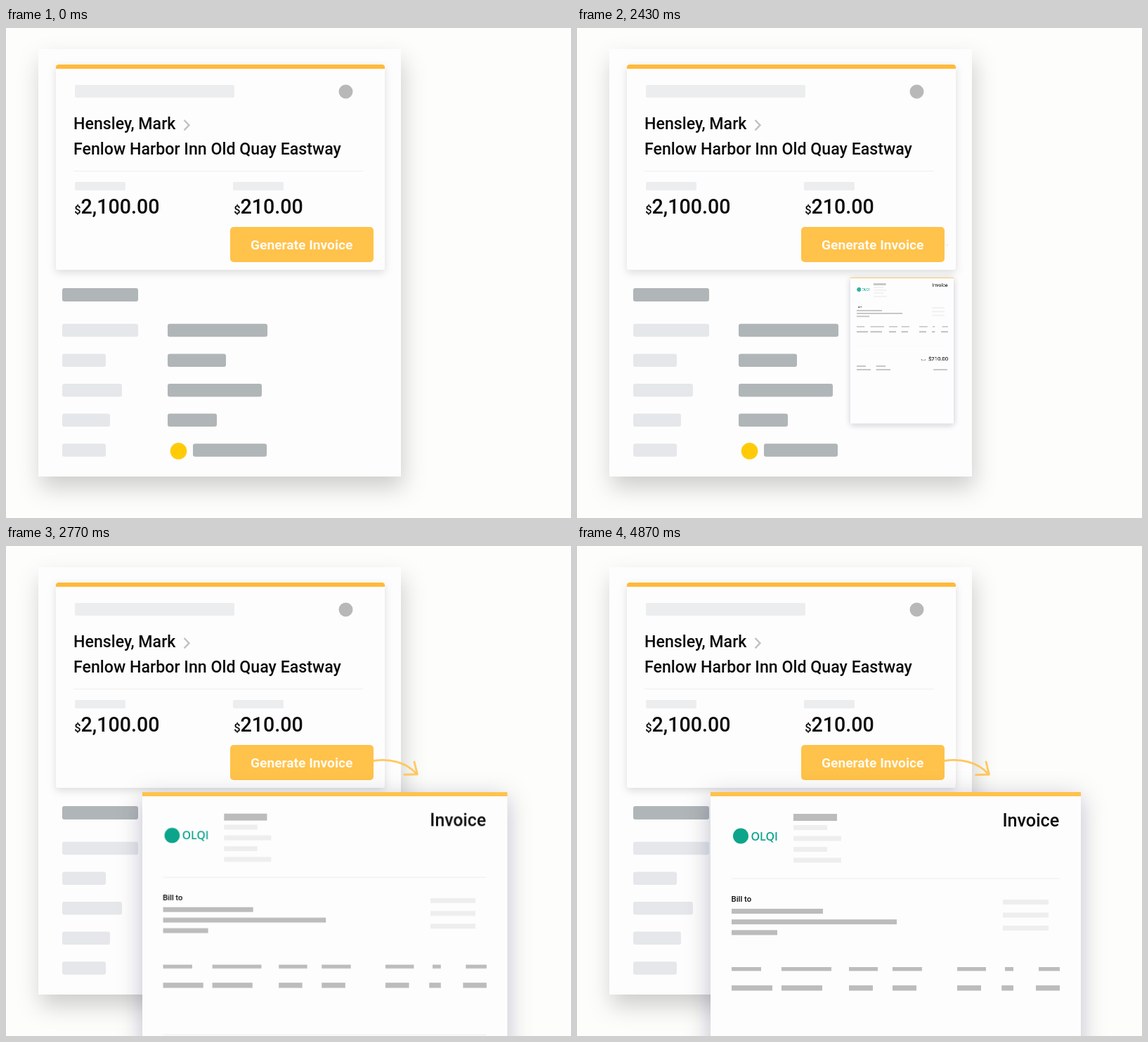
An HTML page for the animation above (4.91 s loop, 804x697 px).

```html
<!DOCTYPE html>
<html lang="en">
<head>
<meta charset="utf-8">
<title>Generate invoice</title>
<style>
  html, body { margin: 0; width: 100%; height: 100%; overflow: hidden; background: #fdfdfc; }
  svg { display: block; width: 804px; height: 697px; }
  text { font-family: Roboto, Arial, sans-serif; font-weight: 500; fill: #0b0b0d; }
  #invoice, #arrow { transform-box: view-box; transform-origin: 0 0; }
  .button { font-weight: 700; fill: #fffaf0; }
  .brand { font-family: 'Open Sans', sans-serif; font-weight: 600; }
  .brand, .mark { fill: #0ca58c; }
  .dark { fill: #b0b5b8; }
  .light { fill: #e5e7ea; }
  .pale { fill: #ecedef; }
  .ink { fill: #bcbcbd; }
  .faint { fill: #eeeeee; }
</style>
</head>
<body>
<svg viewBox="0 0 804 697">
  <defs>
    <filter id="deep" filterUnits="userSpaceOnUse" x="0" y="0" width="804" height="697">
      <feDropShadow dx="3" dy="16" stdDeviation="16" flood-color="#000" flood-opacity=".19"/>
    </filter>
    <filter id="soft" filterUnits="userSpaceOnUse" x="40" y="30" width="540" height="350">
      <feDropShadow dx="0" dy="4" stdDeviation="6" flood-color="#000" flood-opacity=".13"/>
    </filter>
    <filter id="cool" filterUnits="userSpaceOnUse" x="120" y="280" width="680" height="900">
      <feDropShadow dx="0" dy="8" stdDeviation="17" flood-color="#20263a" flood-opacity=".25"/>
    </filter>
  </defs>

  <g id="panel">
    <rect x="46" y="30" width="516" height="608" fill="#fdfdfd" filter="url(#deep)"/>
    <rect x="71" y="52" width="468" height="292" rx="4" fill="#fdfdfd" filter="url(#soft)"/>
    <path d="M71 58v-2a4 4 0 0 1 4-4h460a4 4 0 0 1 4 4v2z" fill="#ffba3a"/>
    <circle cx="483.5" cy="90.5" r="10" fill="#b8b8b8"/>
    <text x="96" y="144.3" font-size="23.2">Hensley, Mark</text>
    <path d="M253.5 131l7 7.2-7 7.2" fill="none" stroke="#bfc1c4" stroke-width="2.4"/>
    <text x="96" y="180.3" font-size="23.2">Fenlow Harbor Inn Old Quay Eastway</text>
    <path d="M96 203.5H508" stroke="#efefef"/>
    <text x="97.3" y="264" font-size="16.5">$</text>
    <text x="106.6" y="264.3" font-size="28.6">2,100.00</text>
    <text x="324.3" y="264" font-size="16.5">$</text>
    <text x="333.6" y="264.3" font-size="28.6">210.00</text>
    <rect x="319" y="283" width="204" height="50" rx="5" fill="#ffc24a"/>
    <text class="button" x="420.7" y="314.8" font-size="19.2" text-anchor="middle">Generate Invoice</text>
    <circle cx="245.5" cy="601.8" r="11.8" fill="#ffcb08"/>
  </g>

  <g id="arrow" fill="none" stroke="#ffc75c" stroke-width="2.8" stroke-linecap="round" stroke-linejoin="round">
    <path d="M523 305.5C546 302 570 307 585 324"/>
    <path d="M567.5 325.5L586.5 325L582 307"/>
  </g>

  <g id="invoice">
    <rect x="190" y="350" width="527" height="746" fill="#fdfdfd" filter="url(#cool)"/>
    <rect x="190" y="350" width="527" height="6" fill="#ffc24a"/>
    <circle class="mark" cx="233" cy="412.5" r="11"/>
    <text class="brand" x="247.5" y="418.5" font-size="16">OLQI</text>
    <text x="686.3" y="399" font-size="25.2" text-anchor="end">Invoice</text>
    <path d="M220 473H687M220 700H687" stroke="#ececf2"/>
    <text x="219.5" y="506" font-size="11.3">Bill to</text>
    <text x="549" y="776" font-size="11">Total</text>
    <text x="688" y="776.5" font-size="27.4" text-anchor="end">$210.00</text>
  </g>
</svg>
<script>
const LOOP = 4910, START = 2179, END = START + 700;
const EASE = 'cubic-bezier(.98, 0, .25, 1)';
const $ = id => document.getElementById(id);
const panel = $('panel'), invoice = $('invoice');

function bar(parent, cls, x, y, width, height, rx = 0) {
  const r = document.createElementNS('http://www.w3.org/2000/svg', 'rect');
  const attrs = { class: cls, x, y, width, height, rx };
  for (const k in attrs) r.setAttribute(k, attrs[k]);
  parent.append(r);
}

// Left-aligned bars, one below the other.
function stack(parent, cls, x, y, step, height, widths, rx) {
  widths.forEach((w, i) => bar(parent, cls, x, y + i * step, w, height, rx));
}

// Booking panel
bar(panel, 'pale', 98, 81, 227, 18, 2);
for (const x of [98, 323]) bar(panel, 'pale', x, 219, 72, 12, 2);
bar(panel, 'dark', 80, 370, 108, 19, 3);
stack(panel, 'light', 80, 420.8, 42.6, 18.5, [108, 62, 85, 68, 62], 3);
stack(panel, 'dark', 230, 420.8, 42.6, 18.5, [142, 83, 134, 70], 3);
bar(panel, 'dark', 266, 591.2, 105, 18.5, 3);

// Invoice address, customer and dates
bar(invoice, 'ink', 308, 381, 62, 10);
for (let i = 0; i < 4; i++) bar(invoice, 'faint', 308, 397 + i * 15.5, 48 + i % 2 * 20, 7);
stack(invoice, 'ink', 220, 516, 15.2, 7, [130, 235, 65]);
stack(invoice, 'faint', 606, 503, 18.5, 7, [65, 65, 65]);

// Invoice table: values follow the headings, the last columns align right.
const starts = [220, 291, 387, 449, 541, 609, 657];
const heads = [42, 71, 41, 42, 41, 12, 30];
starts.forEach((x, i) => {
  const head = heads[i], value = Math.min(head * 1.4, i < 2 ? 58 : 34);
  bar(invoice, 'ink', x, 599, head, 5.5);
  bar(invoice, 'ink', i > 4 ? x + head - value : x, 625, value, 7.5);
});

// Invoice footer
for (const x of [220, 320]) stack(invoice, 'ink', x, 801, 16, 7, [48, 72]);
bar(invoice, 'ink', 613, 817, 72, 7);

// Holds the first value, moves between two times, then holds the last value.
function move(el, prop, from, to, t0, t1, easing) {
  el.animate([
    { [prop]: from, offset: 0 },
    { [prop]: from, offset: t0 / LOOP, easing },
    { [prop]: to, offset: t1 / LOOP },
    { [prop]: to, offset: 1 }
  ], { duration: LOOP, iterations: Infinity });
}

const sheet = (x, y, s) => `translate(${x}px, ${y}px) scale(${s}) translate(-190px, -350px)`;
const grow = s => `translate(523px, 308px) scale(${s}) translate(-523px, -308px)`;

move(invoice, 'transform', sheet(405, 355, 0.222), sheet(190, 350, 1), START, END, EASE);
move(invoice, 'opacity', 0, 1, START, 2460, 'ease-in');
move($('arrow'), 'transform', grow(0), grow(1), START, END, EASE);
</script>
</body>
</html>
```
